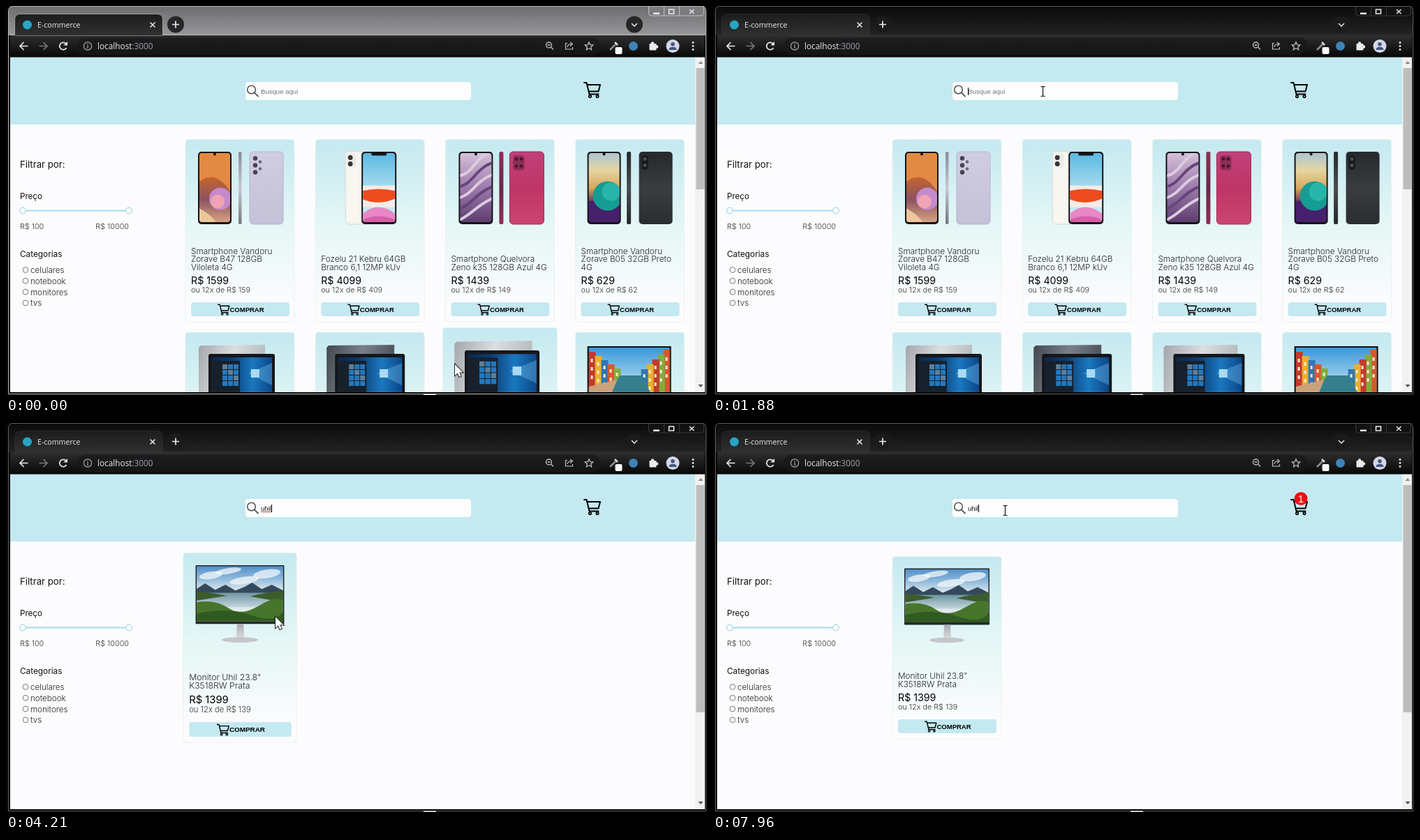
These frames come from a looping animation (1004x558 px, 8 s). An HTML page with a canvas:

```html
<!DOCTYPE html>
<html lang="pt-BR">
<head>
<meta charset="utf-8">
<title>E-commerce</title>
<style>
html, body { margin: 0; width: 100%; height: 100%; overflow: hidden; background: #000; }
canvas { display: block; }
</style>
</head>
<body>
<canvas id="stage" width="1004" height="558"></canvas>
<script>
const c = document.getElementById('stage').getContext('2d');
const LOOP = 8000, BLINK = 530;
const BLUE = '#c4e9f0', PAGE = '#fcfcfe';
const SANS = 'Inter, sans-serif', ARIAL = '"Liberation Sans", Arial, sans-serif', UI = '"Open Sans", sans-serif';

// Timeline
const WORD = 'uhil';
const TYPED = [2100, 2500, 2800, 3080];
const CARET = [790, 2100, 2500, 2800, 3050, 7600];
const FOCUS = 790, FILTER = 3080, BUY = 5960, REFOCUS = 7600;
const PATH = [[0, 643, 514], [130, 643, 514], [720, 472, 122], [3670, 472, 122], [4750, 300, 434],
  [6340, 300, 434], [6790, 371, 212], [6960, 371, 212], [7600, 418, 125], [LOOP, 418, 125]];

// Drawing helpers
function box(x, y, w, h, fill, r = 0, stroke, lw = 1) {
  c.beginPath();
  c.roundRect(x, y, w, h, r);
  if (fill) { c.fillStyle = fill; c.fill(); }
  if (stroke) { c.strokeStyle = stroke; c.lineWidth = lw; c.stroke(); }
}
function disc(x, y, r, fill, stroke, lw = 1) {
  c.beginPath();
  c.arc(x, y, r, 0, 7);
  if (fill) { c.fillStyle = fill; c.fill(); }
  if (stroke) { c.strokeStyle = stroke; c.lineWidth = lw; c.stroke(); }
}
function shape(d, fill, stroke, lw = 1) {
  const p = new Path2D(d);
  if (stroke) { c.strokeStyle = stroke; c.lineWidth = lw; c.stroke(p); }
  if (fill) { c.fillStyle = fill; c.fill(p); }
}
function text(s, x, y, font, color = '#111', align = 'left') {
  c.font = font;
  c.fillStyle = color;
  c.textAlign = align;
  c.fillText(s, x, y);
}
function blend(x0, y0, x1, y1, colors) {
  const g = c.createLinearGradient(x0, y0, x1, y1);
  colors.forEach((col, i) => g.addColorStop(i / (colors.length - 1), col));
  return g;
}
const fade = (y0, y1, ...colors) => blend(0, y0, 0, y1, colors);
function at(x, y, scale, draw) {
  c.save();
  c.translate(x, y);
  c.scale(scale, scale);
  draw();
  c.restore();
}
function clipped(x, y, w, h, r, draw) {
  c.save();
  c.beginPath();
  c.roundRect(x, y, w, h, r);
  c.clip();
  draw();
  c.restore();
}

function cart(x, y, scale) {
  at(x, y, scale, () => {
    c.lineCap = c.lineJoin = 'round';
    shape('M1 1H4.5L8.5 17.5H21.5M5 4H24L21.5 13.5H7.5', null, '#000', 2);
    disc(9.5, 20.6, 1.7, null, '#000', 1.7);
    disc(20, 20.6, 1.7, null, '#000', 1.7);
    c.lineCap = 'butt';
    c.lineJoin = 'miter';
  });
}

// Product pictures, in card coordinates
const slab = (x, w, fill, edge) => box(x, 17.5, w, 104, fill, w > 10 ? 5 : 2, edge);
function screen(x, w, fill, draw) {
  slab(x, w, '#141416');
  clipped(x + 2, 19.5, w - 4, 99, 4, () => {
    box(x, 17, w, 105, fill);
    draw();
  });
  disc(x + w / 2, 21, 2, '#141416');
}
function phoneLilac() {
  screen(18, 48, fade(18, 120, '#e08a48', '#c9652c', '#8c5360', '#d9a583'), () => {
    shape('M18 62Q44 40 66 78V18H18Z', '#e28a43');
    shape('M18 98Q36 106 46 122H18Z', '#ecc79c');
    disc(50, 85, 16, '#c48acb');
    disc(46, 89, 10, '#efa3b4');
  });
  slab(76, 4.5, fade(18, 121, '#8d8b98', '#c9c8d6', '#77767f'));
  slab(92, 48, fade(18, 121, '#d0cde2', '#c4c1d8'), '#b6b3cb');
  [[100, 27], [100, 37], [100, 47]].forEach(([x, y]) => disc(x, y, 3.2, '#45424f'));
  [[107, 32], [107, 42]].forEach(([x, y]) => disc(x, y, 2.2, '#6a6677'));
}
function phoneWhite() {
  slab(43, 34, '#f7f6f1', '#d8d8d4');
  box(45, 20, 14, 20, '#ecebe6', 4);
  disc(50, 26, 3.4, '#33333a');
  disc(50, 35, 3.4, '#33333a');
  screen(66, 50, fade(18, 121, '#58b8e3', '#a8dced', '#dff0f2'), () => {
    box(68, 66, 46, 31, '#f4ece6');
    shape('M66 74Q90 68 116 74V84Q92 96 66 85Z', '#ee4b1f');
    shape('M66 108Q90 86 116 108V122H66Z', '#e787c6');
    shape('M66 116Q90 104 116 116V122H66Z', '#d65ea9');
  });
  box(80, 18.5, 22, 4.5, '#141416', 2);
}
function phoneRed() {
  screen(19, 49, fade(18, 121, '#d6c2da', '#9d7aab', '#5a3a6c'), () => {
    for (let i = 0; i < 5; i++)
      shape(`M19 ${52 + i * 16}C40 ${50 + i * 14} 42 ${24 + i * 18} 68 ${16 + i * 17}`, null, i % 2 ? '#65457a' : '#dccbe0', 4);
  });
  slab(77, 6, fade(18, 121, '#8d2f56', '#6b2746', '#8d2f56'));
  slab(92, 49, fade(18, 121, '#c0417a', '#bf3566', '#cc4470'), '#a32554');
  box(97, 23, 16, 21, '#8f2c55', 4);
  [[101.5, 28], [108.5, 28], [101.5, 38], [108.5, 38]].forEach(([x, y]) => disc(x, y, 2.3, '#3d1a2c'));
}
function phoneBlack() {
  screen(17, 48, fade(18, 121, '#a9c3d5', '#e5d6a4', '#d8a75c', '#402058', '#3a1a60'), () => {
    box(17, 88, 50, 34, '#46206a');
    disc(46, 81, 21, '#159c93');
    disc(51, 75, 13, '#28b6a8');
  });
  slab(73.5, 6, fade(18, 121, '#26282b', '#4a4d50', '#26282b'));
  slab(91, 48, fade(18, 121, '#26292c', '#393d40', '#2a2d30'));
  box(95, 23, 9, 20, '#17191b', 4);
  disc(99.5, 28, 2.5, '#4b5055');
  disc(99.5, 37, 2.5, '#4b5055');
}
function laptop(lid, x, w, sx, sw) {
  shape(`M${x + 3} 19L${x + w} 18V100H${x}V22Z`, blend(x, 20, x + w, 50, lid));
  box(sx, 31, sw, 75, '#15171b', 3);
  box(sx + 4, 36, sw - 8, 70, blend(sx, 0, sx + sw, 0, ['#0a2648', '#0b3a70', '#1a78bf', '#0a3f80']));
  shape(`M${sx + sw * .6} 59L${sx + sw - 4} 44V76Z`, 'rgba(120,200,245,.35)');
  box(sx + 4, 41, 41, 65, '#17212c');
  for (let i = 0; i < 12; i++)
    box(sx + 20 + i % 3 * 8, 46 + (i / 3 | 0) * 8, 7, 7, i % 4 ? '#2478bd' : '#5f7f98');
  box(sx + sw * .64, 53, 12, 12, '#a9daf5');
}
const silver = ['#a4a7ab', '#dcdee0', '#b4b7bb'], graphite = ['#43484f', '#7a8088', '#4a4f57'];
function tv() {
  box(17, 20, 120, 72, '#111214');
  clipped(19, 22, 116, 68, 0, () => {
    box(19, 22, 116, 68, fade(22, 70, '#3a97d8', '#a5d5ef'));
    const walls = ['#c23a2c', '#e8b02c', '#2f77b4', '#d8572d', '#7fae3d'];
    walls.forEach((col, i) => {
      box(19 + i * 9, 28 + i * 6, 10, 70, col);
      box(126 - i * 8, 25 + i * 7, 10, 70, walls[(i + 3) % 5]);
      for (let k = 0; k < 3; k++) {
        box(22 + i * 9, 38 + i * 5 + k * 12, 3, 5, '#f2e8d2');
        box(129 - i * 8, 36 + i * 6 + k * 12, 3, 5, '#f2e8d2');
      }
    });
    shape('M64 62H95L110 92H45Z', '#357f8e');
    shape('M19 78L60 68L50 92H19Z', '#c9a27a');
  });
}
function monitor() {
  box(17, 17, 122, 81, '#25282c', 1);
  clipped(18.5, 18.5, 119, 76, 0, () => {
    box(18, 18, 120, 78, fade(18, 52, '#4f8fc9', '#8db9dd', '#dfe8ea'));
    c.fillStyle = 'rgba(245,248,250,.75)';
    [[38, 31, 16, 5], [62, 25, 18, 4], [84, 38, 20, 5], [115, 29, 19, 6]].forEach(e => {
      c.beginPath();
      c.ellipse(...e, -.15, 0, 7);
      c.fill();
    });
    shape('M18 50L30 42L44 51L58 44L72 52L84 47L95 41L108 50L122 44L138 52V64H18Z', '#34495c');
    box(18, 55, 120, 20, fade(55, 75, '#6f93a0', '#c2d6dd'));
    shape('M18 53Q45 56 60 59L18 66ZM138 52Q108 55 92 60L138 68Z', '#3d5c2e');
    shape('M18 68Q45 64 62 76T104 73T138 66V98H18Z', '#47752c');
    shape('M18 84Q60 74 94 86T138 80V98H18Z', '#2f5a20');
  });
  shape('M74 98H83L84 118H73Z', fade(98, 118, '#a9acb2', '#dcdde0'));
  c.beginPath();
  c.ellipse(78, 120, 25, 3.8, 0, 0, 7);
  c.fillStyle = '#c4c6cb';
  c.fill();
}

// Catalogue
const CARD_W = 156, CARD_H = 261.5;
const cell = (col, row, pic, lines, price, part) => ({ x: 257 + col * 186.2, y: 191.5 + row * 276.5, pic, lines, price, part });
const ALL = [
  cell(0, 0, phoneLilac, ['Smartphone Vandoru', 'Zorave B47 128GB', 'Viloleta 4G'], 1599, 159),
  cell(1, 0, phoneWhite, ['Fozelu 21 Kebru 64GB', 'Branco 6,1 12MP kUv'], 4099, 409),
  cell(2, 0, phoneRed, ['Smartphone Quelvora', 'Zeno k35 128GB Azul 4G'], 1439, 149),
  cell(3, 0, phoneBlack, ['Smartphone Vandoru', 'Zorave B05 32GB Preto', '4G'], 629, 62),
  cell(0, 1, () => laptop(silver, 19, 95, 33, 95)),
  cell(1, 1, () => laptop(graphite, 16, 97, 28, 100)),
  cell(2, 1, () => laptop(silver, 16, 106, 30, 102)),
  cell(3, 1, tv)
];
const FOUND = [cell(0, 0, monitor, ['Monitor Uhil 23.8"', 'K3518RW Prata'], 1399, 139)];

// State at a time
function pointer(t) {
  t = Math.max(0, t);
  const i = Math.max(1, PATH.findIndex(k => k[0] >= t));
  const [t0, x0, y0] = PATH[i - 1], [t1, x1, y1] = PATH[i];
  const u = (t - t0) / (t1 - t0), e = u * u * (3 - 2 * u);
  return [x0 + (x1 - x0) * e, y0 + (y1 - y0) * e];
}
const inside = ([x, y], bx, by, w, h) => x >= bx && x <= bx + w && y >= by && y <= by + h;
const onButton = (p, k) => k.price && inside(p, k.x + 6, k.y + 235, 146, 24);
// Mean of recent hover states gives a 150 ms transition
function hover(t, k) {
  let sum = 0;
  for (let i = 0; i < 15; i++) sum += inside(pointer(t - i * 10), k.x, k.y, CARD_W, CARD_H);
  return sum / 15;
}

function card(k, t, p) {
  at(k.x + CARD_W / 2, k.y + CARD_H / 2, 1 + .05 * hover(t, k), () => {
    c.translate(-CARD_W / 2, -CARD_H / 2);
    box(0, 0, CARD_W, CARD_H, fade(0, CARD_H * .9, BLUE, '#e4f6f6', PAGE), 4, '#e6f3ec');
    k.pic();
    if (!k.price) return;
    k.lines.forEach((s, i) => text(s, 8, 187.5 - (k.lines.length - 1 - i) * 11.6, '300 11.8px ' + SANS, '#222'));
    text('R$ ' + k.price, 8, 207.5, '400 14.2px ' + SANS, '#000');
    text('ou 12x de R$ ' + k.part, 8, 219.5, '300 10.8px ' + SANS, '#333');
    box(8, 233.5, 141, 20, onButton(p, k) ? '#08d0e8' : BLUE, 4);
    cart(46, 236, .7);
    text('COMPRAR', 63.5, 247, 'bold 9.5px ' + ARIAL, '#000');
  });
}

function header(t) {
  box(6, 73, 981, 97, BLUE);
  box(343, 109, 323, 26, '#fdfdfe', 4);
  disc(351.5, 120, 5.8, null, '#555', 1.6);
  shape('M355.8 124.3L361.5 130', null, '#555', 1.8);
  const word = WORD.slice(0, TYPED.filter(k => t >= k).length), font = '9.6px ' + ARIAL;
  text(word || 'Busque aqui', 365, 125.5, font, word ? '#111' : '#757575');
  c.font = font;
  const end = 365 + c.measureText(word).width;
  if (t >= 4110 && t < BUY) shape(`M365 127.5H${end}`, null, '#d04848');
  const last = CARET.filter(k => k <= t).pop();
  const focused = t >= FOCUS && t < BUY || t >= REFOCUS;
  if (focused && Math.floor((t - last) / BLINK) % 2 === 0) box(Math.round(end), 117, 1, 11, '#000');
  cart(827, 109, 1);
  if (t >= BUY) {
    disc(842, 108.5, 9.5, '#f50d0d');
    text('1', 842, 113.5, '15px ' + ARIAL, '#fff', 'center');
  }
}

function sidebar() {
  text('Filtrar por:', 20, 232, '400 13.2px ' + SANS);
  text('Preço', 20, 277, '400 11.6px ' + SANS);
  box(24, 292.5, 152, 2, '#a6d9e8');
  disc(24, 293.5, 4.3, PAGE, '#a6d9e8', 1.2);
  disc(176, 293.5, 4.3, PAGE, '#a6d9e8', 1.2);
  text('R$ 100', 20, 319.5, '300 10.8px ' + SANS, '#333');
  text('R$ 10000', 176, 319.5, '300 10.8px ' + SANS, '#333', 'right');
  text('Categorias', 20, 360, '400 11.8px ' + SANS);
  ['celulares', 'notebook', 'monitores', 'tvs'].forEach((s, i) => {
    disc(28, 378.5 + i * 15.8, 3.9, '#fff', '#777');
    text(s, 35, 383 + i * 15.8, '300 11.6px ' + SANS, '#222');
  });
}

function scrollbar(t) {
  box(987, 73, 14, 481, '#f1f1f1');
  box(988.5, 89, 12, t < FILTER ? 174 : 326, '#bdbdbd');
  shape('M991.5 83L995 79L998.5 83Z', '#8a8a8a');
  shape('M991.5 543L995 547L998.5 543Z', '#505050');
}

function browser(active) {
  const light = '#e8eaed', rim = active ? '#5c5c60' : '#b9b9bb';
  box(0, 0, 1004, 73, '#060607');
  box(4, 0, 998, 42, active ? fade(0, 42, '#0a0a0b', '#232324') : fade(0, 42, '#6c6c6e', '#98989a'), [5, 5, 0, 0]);
  box(6, 41, 995, 32.5, fade(41, 73, '#2f2f30', '#1c1c1d', '#080809'));
  if (!active) shape('M6 41.5H13M224 41.5H1001', null, '#c4c4c6');
  shape('M13 42V19Q13 12 20 12H217Q224 12 224 19V42Z', fade(12, 42, '#1d1d1e', '#303031'), active ? '#3a3a3c' : '#b9b9bb');
  disc(30.5, 27, 6.5, '#27a5c4');
  text('E-commerce', 45, 30.5, '10.6px ' + UI, light);
  shape('M206.5 23.5L213.5 30.5M213.5 23.5L206.5 30.5', null, light, 1.5);
  [243, 900].forEach(x => disc(x, 26.5, 12, active ? '#1b1b1c' : '#262628'));
  shape('M238 26.5H248M243 21.5V31.5', null, light, 1.7);
  shape('M896 25L900 29L904 25', null, light, 1.5);
  const edge = active ? '#39393b' : '#c2c2c4';
  box(920.5, -4, 79, 18, active ? '#121213' : '#7b7b7d', 4, edge);
  shape('M942.5 0V14M964.5 0V14', null, edge);
  box(927, 9.5, 9, 2.5, light);
  box(949.5, 5, 7, 6, null, 0, light, 1.6);
  shape('M979 5L985.5 11M985.5 5L979 11', null, light, 1.6);

  box(101, 45.5, 751, 25, 'rgba(24,24,26,.75)', 12.5);
  shape('M31.5 57.5H20.5M25.5 52L20 57.5L25.5 63', null, light, 1.7);
  shape('M47.5 57.5H58.5M53.5 52L59 57.5L53.5 63', null, '#77787b', 1.7);
  c.beginPath();
  c.arc(82, 57.5, 5.2, .5, 5.5);
  c.strokeStyle = light;
  c.lineWidth = 1.7;
  c.stroke();
  shape('M88 51V56.5H82.5Z', light);
  disc(117, 57.5, 5.6, null, '#a4a6a9', 1.2);
  shape('M117 56.5V61M117 54V55.4', null, '#a4a6a9', 1.3);
  const url = '11.8px ' + UI;
  text('localhost', 131, 61.5, url, light);
  text(':3000', 131 + c.measureText('localhost').width, 61.5, url, '#9aa0a6');
  const dim = '#c3c5c8';
  disc(777.5, 56, 4, null, dim, 1.3);
  shape('M780.5 59L784 62.5M775.5 56H779.5', null, dim, 1.3);
  shape('M804 53.5H801.5V62H811.5V59M804 59Q804.5 54.5 810 54.5M808 52L811.5 54.5L808 57.5', null, dim, 1.2);
  shape('M835 51.8L836.7 55.6L840.8 56L837.7 58.7L838.6 62.7L835 60.6L831.4 62.7L832.3 58.7L829.2 56L833.3 55.6Z', null, dim, 1.2);
  shape('M865 63L873 55', null, '#8c8e92', 2.5);
  shape('M872 52L876 56', null, '#d9dadc', 2.5);
  box(872.5, 59, 10, 10, '#fafafa', 2);
  disc(898.5, 57.5, 6.5, '#3f83b5');
  box(921.5, 54, 10, 9.5, light, 1);
  disc(926, 53.5, 2.2, light);
  disc(932, 58.5, 2.2, light);
  disc(955, 57.5, 9.5, '#d3d8e8');
  disc(955, 54.7, 2.8, '#46567c');
  shape('M949.5 63Q949.5 58.8 955 58.8T960.5 63Z', '#46567c');
  [52.5, 57.5, 62.5].forEach(y => disc(984, y, 1.4, light));

  box(0, 42, 6, 516, '#060607');
  box(1001, 42, 3, 516, '#060607');
  box(0, 554, 1004, 4, '#060607');
  box(3.5, .5, 999, 556, null, [6, 6, 0, 0], rim);
  box(598, 556.5, 18, 1.5, '#e8e8e8');
}

function cursor(p, cards) {
  c.save();
  c.translate(Math.round(p[0]), Math.round(p[1]));
  if (inside(p, 343, 109, 323, 26))
    shape('M-2.5 -6.5H-.5L.5 -5.5L1.5 -6.5H3.5M.5 -5.5V6.5M-2.5 7.5H-.5L.5 6.5L1.5 7.5H3.5', null, '#111', 1.2);
  else if (cards.some(k => onButton(p, k)))
    shape('M-1.5 0Q0 -2.5 1.5 0V6.5Q3.5 5 4.7 7Q6.5 6 7.6 8Q9.8 7.5 9.8 10V14Q9 17 7.5 19H.5Q-3.5 14 -5.5 10.5Q-4.5 8.5 -1.5 11.5Z', '#fff', '#111', 1.8);
  else
    shape('M0 0V16L3.8 12.6L6.2 18L8.8 17L6.4 11.6H11.5Z', '#fff', '#111', 1.8);
  c.restore();
}

function render(t) {
  const p = pointer(t), cards = t < FILTER ? ALL : FOUND;
  box(0, 0, 1004, 558, PAGE);
  header(t);
  sidebar();
  cards.forEach(k => card(k, t, p));
  scrollbar(t);
  browser(t >= FOCUS);
  cursor(p, cards);
}

const start = performance.now();
function tick() {
  render((performance.now() - start) % LOOP);
  requestAnimationFrame(tick);
}
tick();
</script>
</body>
</html>
```
